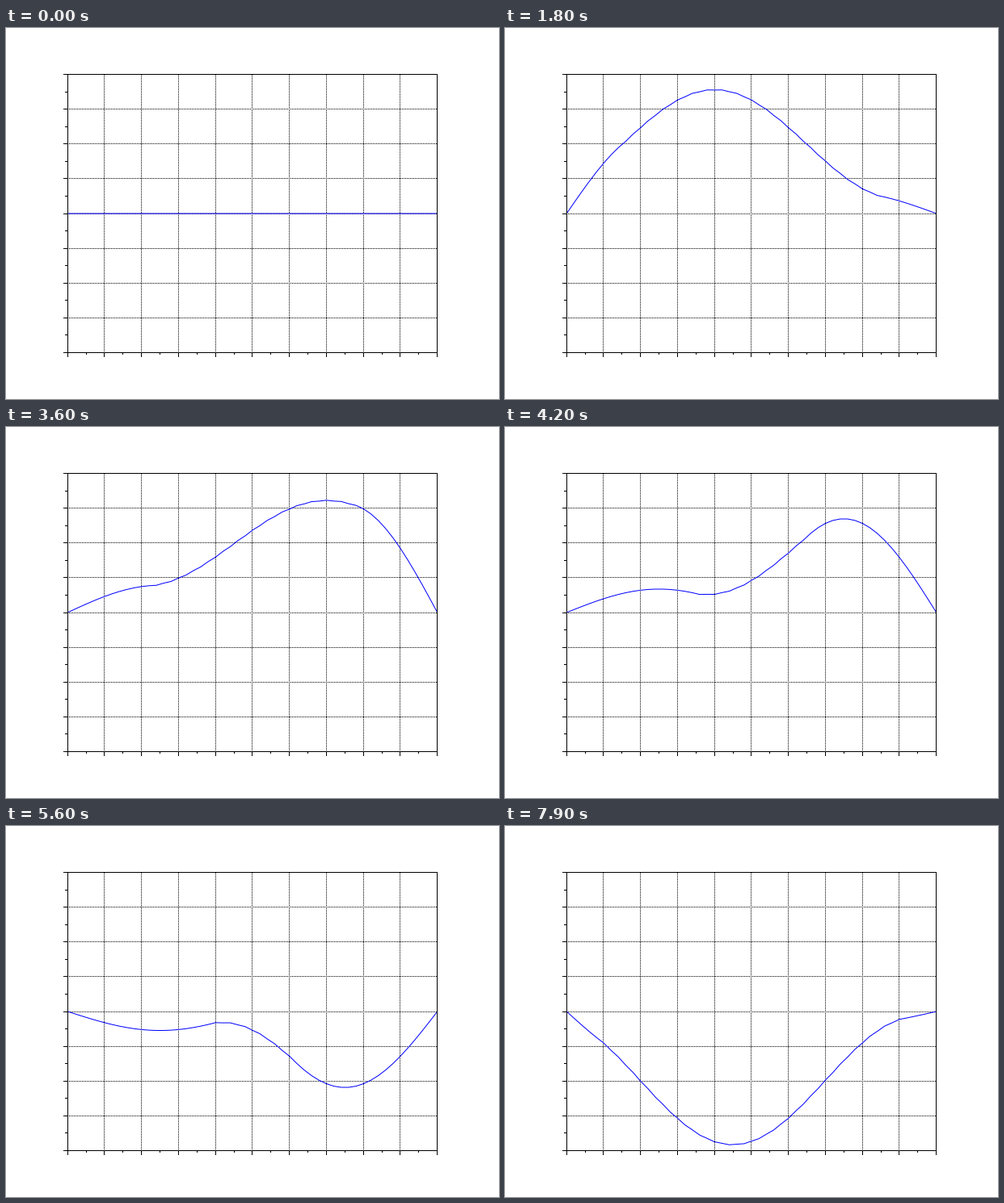
Recreate the animation shown at these times as a matplotlib script. Size 610 px wide and 460 px high, loop 8 s.

```python
import numpy as np
import matplotlib.pyplot as plt
from matplotlib.animation import FuncAnimation

W, H, DPI = 610, 460, 80
PX = 72 / DPI                       # one pixel in points
FRAMES, INTERVAL = 80, 100

# Plot box in pixels
X0, X1 = W * 0.125, W * 0.875
Y0, Y1 = H * 0.125, H * 0.875
NX, NY = 10, 8
SCALE = (Y1 - Y0) / 0.4             # the y axis spans -0.2 to 0.2
MID = (Y0 + Y1) / 2

fig = plt.figure(figsize=(W / DPI, H / DPI), dpi=DPI, facecolor="white")
ax = fig.add_axes([0, 0, 1, 1])
ax.set_xlim(0, W)
ax.set_ylim(H, 0)
ax.axis("off")


def line(xs, ys, color="black", **kw):
    style = dict(lw=PX, snap=False, clip_on=False, solid_capstyle="butt",
                 dash_capstyle="butt", solid_joinstyle="miter")
    return ax.plot(xs, ys, color=color, **style, **kw)[0]


def hline(row, a, b, **kw):
    line([a, b], [row + 0.5] * 2, **kw)


def vline(col, a, b, **kw):
    line([col + 0.5] * 2, [a, b], **kw)


# Pixel columns and rows of all ticks; y counts down, so ties round the other way
cols = np.ceil(np.linspace(X0, X1, 2 * NX + 1)).astype(int) - 1
rows = np.floor(np.linspace(Y0, Y1, 2 * NY + 1)).astype(int)
left, right, top, bottom = cols[0], cols[-1], rows[0], rows[-1]

# Dotted grid, running from the lower left corner
dots = dict(dashes=(1, 1), zorder=1)
for c in cols[2:-2:2]:
    vline(c, bottom + 1, top, **dots)
for r in rows[2:-2:2]:
    hline(r, left, right, **dots)

for i, c in enumerate(cols):
    vline(c, bottom, bottom + (3 if i % 2 else 6), zorder=3)
for i, r in enumerate(rows):
    hline(r, left - (3 if i % 2 else 5), left, zorder=3)
for r in (top, bottom):
    hline(r, left, right + 1, zorder=3)
for c in (left, right):
    vline(c, top, bottom + 1, zorder=3)

# Vibrating string, u_tt = u_xx, fixed ends, flat start with a velocity kick
N = 50
STEP = 1 / N
x = np.linspace(0, 1, N + 1)
kick = np.sin(2 * np.pi * x)
kick = np.where(x <= 0.5, kick, -kick / 4)
kick[[0, N // 2, N]] = 0

u = np.zeros((FRAMES, N + 1))
u[1] = STEP * kick
for n in range(1, FRAMES - 1):
    u[n + 1, 1:-1] = u[n, 2:] + u[n, :-2] - u[n - 1, 1:-1]

curve = line(X0 + x * (X1 - X0), MID - SCALE * u[0], color="blue", zorder=2)


def draw(n):
    curve.set_ydata(MID - SCALE * u[n])
    return [curve]


anim = FuncAnimation(fig, draw, frames=FRAMES, interval=INTERVAL,
                     repeat=True, repeat_delay=0, blit=False)
plt.show()
```
